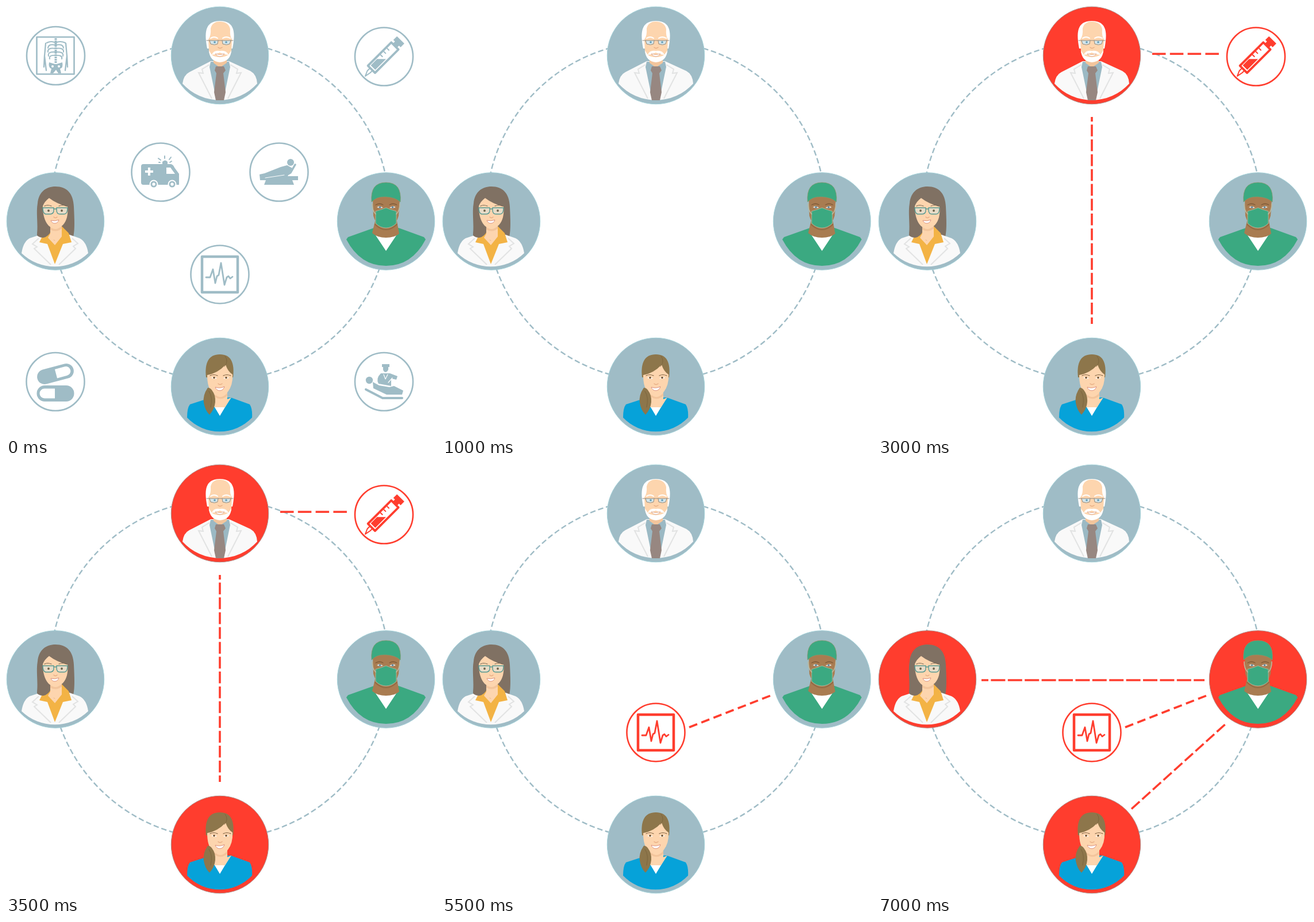
Write an HTML page that moves like this. It is 748 by 748 pixels and loops after 8000 ms.

```html
<!DOCTYPE html>
<html>
<head>
<meta charset="utf-8">
<style>
html, body { margin: 0; width: 100%; height: 100%; overflow: hidden; background: #fff }
svg { display: block; width: 100vw; height: 100vh }
.icon { color: #9fbcc6; fill: currentColor; stroke: none }
.icon.hot { color: #ff3d2e }
.icon .o { fill: none; stroke: currentColor; stroke-linecap: round; stroke-linejoin: round }
.icon .rim { fill: #fff; stroke: currentColor; stroke-width: 2.6 }
.icon .w { fill: #fff }
.disc { fill: #9fbcc6; stroke: #a6d3da; stroke-width: 1 }
.hot .disc { fill: #ff3d2e; stroke: #b08a86 }
.link { stroke: #ff3d2e; stroke-width: 3.6; fill: none }
.skin { fill: #fdd5ae }
.shade { fill: #f3c59c }
.coat { fill: #f9f9f9 }
.fold { fill: none; stroke: #e2e3e3; stroke-width: 2 }
.line { fill: none; stroke-linecap: round }
</style>
</head>
<body>
<svg viewBox="0 0 748 748">
  <circle cx="372" cy="357" r="295" fill="none" stroke="#9fbcc6" stroke-width="2.4" stroke-dasharray="9.5 4.8"/>

  <!-- links -->
  <path id="syringeLink" class="link" d="M477 83.300H593" stroke-dasharray="23.500 7.300"/>
  <path id="downLink" class="link" d="M372 193V553" stroke-dasharray="20.500 5.300" stroke-dashoffset="12.500"/>
  <path id="pulseLink" class="link" d="M430 458L571 403" stroke-dasharray="15 7.7"/>
  <g id="teamLinks" class="link">
    <path d="M180 376H568" stroke-dasharray="25 4.4" stroke-dashoffset="13"/>
    <path d="M441 600L606 451" stroke-dasharray="19 6"/>
  </g>

  <!-- senior doctor -->
  <g id="doctor">
    <circle class="disc" cx="372" cy="86" r="84.7"/>
    <path class="coat" d="M307 135Q309 120 319 115L356 96H388L425 113Q436 119 437 135A88 88 0 0 1 307 135Z"/>
    <path d="M356 97L354 106L366 164H378L390 106L388 97Z" fill="#9bb9c4"/>
    <path class="fold" d="M354 102L341 110L343 117L335 116L358 161M390 102L403 110L401 117L409 116L386 161"/>
    <path class="shade" d="M361 88H384V99L372 107L361 99Z"/>
    <path d="M365 105H379L382 112L378 117L382 150L379 164H365L362 150L366 117L363 112Z" fill="#978781"/>
    <path d="M350 74C345 48 345 26 372 26S399 48 394 74Z" fill="#fff"/>
    <path class="skin" d="M352 58Q357 52 356 39C358 30 365 27 372 27S388 30 390 40Q389 52 393 58L392 80Q388 94 372 97Q356 94 353 80Z"/>
    <path d="M353 77Q358 86 361 87Q372 91 383 87Q387 86 392 77Q391 96 372 98Q354 96 353 77Z" fill="#fff"/>
    <path d="M358 85Q361 76 372 78Q383 76 387 85Q378 84 372 81Q366 84 358 85Z" fill="#fff"/>
    <path d="M364 83Q372 86 380 83Q377 88 372 88Q367 88 364 83Z" fill="#fff" stroke="#d99c80" stroke-width=".8"/>
    <path d="M354 60H369L368 65Q361 69 356 66ZM376 60H391L389 66Q382 69 377 65Z" fill="#d4e5ea"/>
    <path class="line" d="M349 60H395M354 60L356 66Q363 69 368 66L369 60M376 60L377 66Q384 69 389 66L391 60" stroke="#92897c" stroke-width="1"/>
    <circle cx="363" cy="63" r="1.8" fill="#639eb9"/><circle cx="383" cy="63" r="1.8" fill="#639eb9"/>
    <path class="line" d="M356 56Q362 52 368 56M377 56Q383 52 390 56" stroke="#fff" stroke-width="2"/>
    <path class="line" d="M369 72Q372 75 376 72" stroke="#e7ad83" stroke-width="1.3"/>
  </g>

  <!-- woman with glasses -->
  <g id="woman">
    <circle class="disc" cx="86" cy="374.5" r="84.7"/>
    <path d="M54 399C56 378 52 360 55 343C57 323 70 314 86 314C106 314 117 326 118 349C119 370 120 389 117 402H60Z" fill="#807163"/>
    <path class="coat" d="M27 430Q30 410 41 404L62 397H108L128 404Q140 410 143 430A84 84 0 0 1 27 430Z"/>
    <path d="M64 399L58 411L72 414L85 449L99 414L114 411L109 395L97 383L77 392Z" fill="#f3b345"/>
    <path d="M54 399L57 370H75L78 392Q74 401 65 403Q58 403 54 399Z" fill="#807163"/>
    <path class="skin" d="M77 380H97V401L85 416L73 403L77 396Z"/>
    <path class="shade" d="M77 384Q87 393 97 382V387Q88 395 77 389Z"/>
    <path class="skin" d="M64 348Q67 340 75 334Q88 344 107 349Q109 370 99 381Q86 393 74 382Q64 371 64 348Z"/>
    <path class="fold" d="M57 404L46 414L54 419L49 422L78 450M115 404L125 413L117 418L121 422L92 450"/>
    <path d="M64 351H83V357Q82 362 76 362H69Q64 361 64 351ZM88 351H107Q107 362 101 362H94Q88 362 88 355Z" fill="#e8dcc8" stroke="#579a92" stroke-width="1.4"/>
    <path d="M83 353H88" stroke="#579a92" stroke-width="1.5"/>
    <circle cx="74" cy="356" r="1.9" fill="#70644b"/><circle cx="97" cy="356" r="1.9" fill="#70644b"/>
    <path class="line" d="M67 348Q72 345 79 348M92 348Q99 345 105 348" stroke="#75634f" stroke-width="1.2"/>
    <path class="line" d="M83 367Q86 370 89 367" stroke="#e7ad83" stroke-width="1.3"/>
    <path d="M78 373Q85 375 92 372Q90 378 85 378Q80 378 78 373Z" fill="#fff" stroke="#d98a78" stroke-width=".9"/>
    <path class="line" d="M83 407L85 408" stroke="#eab58b"/>
  </g>

  <!-- surgeon -->
  <g id="surgeon">
    <circle class="disc" cx="661" cy="374.5" r="84.7"/>
    <path d="M592 406L595 402L640 386H683L727 402L730 406Q706 452 661 452T592 406Z" fill="#3ba981"/>
    <path d="M643 399H679L661 426Z" fill="#fff"/>
    <path d="M642 374H680L684 396Q676 403 661 403T637 395Z" fill="#a97c51"/>
    <path class="line" d="M642 380Q661 398 680 380" stroke="#946b44" stroke-width="2"/>
    <path d="M638 336Q661 324 685 336L683 365Q676 388 661 388T639 365Z" fill="#a97c51"/>
    <path d="M636 341Q633 307 661 307T686 341Q678 333 661 332T636 341Z" fill="#3ba981" stroke="#8d9468" stroke-width=".7"/>
    <path d="M643 357Q654 354 661 351Q668 354 679 357V378Q671 386 661 386T643 378Z" fill="#3ba981" stroke="#b0c0a6" stroke-width=".8"/>
    <path class="line" d="M637 344Q637 356 643 362M685 344Q685 356 679 362" stroke="#bbb99f" stroke-width="1.6"/>
    <path d="M645 350Q650 346 656 351Q650 353 645 350ZM667 351Q673 346 678 350Q673 353 667 351Z" fill="#dfe5e5"/>
    <circle cx="650.5" cy="350" r="1.8" fill="#5e8499"/><circle cx="672.5" cy="350" r="1.8" fill="#5e8499"/>
    <path class="line" d="M643 346Q650 342 656 346M667 346Q673 342 680 346" stroke="#805b38" stroke-width="1.3"/>
  </g>

  <!-- nurse -->
  <g id="nurse">
    <circle class="disc" cx="372" cy="662" r="84.7"/>
    <path d="M315 716Q315 699 320 693L357 681H391L424 693Q429 701 428 716A78 78 0 0 1 315 716Z" fill="#06a2d9"/>
    <path d="M357 688L372 713L387 688Z" fill="#fff"/>
    <path class="skin" d="M362 668H385V684L392 681L381 698H363L353 683L362 684Z"/>
    <path class="shade" d="M362 674Q373 687 385 673V678Q374 688 362 679Z"/>
    <path d="M348 646C345 620 353 606 372 606S398 620 395 646Z" fill="#8d764b"/>
    <path class="skin" d="M350 642Q368 639 382 624Q386 636 394 641Q395 659 386 671Q373 685 359 673Q350 664 350 642Z"/>
    <path d="M351 664Q355 664 358 668Q365 677 364 689T354 711Q346 703 344 690T351 664Z" fill="#8d764b"/>
    <path class="line" d="M381 609Q388 618 380 627M353 670Q360 680 356 698" stroke="#7a643d" stroke-width=".9"/>
    <path d="M357 647Q362 643 367 648Q361 649 357 647ZM378 648Q383 643 388 647Q384 649 378 648Z" fill="#fff"/>
    <circle cx="362" cy="646.5" r="1.8" fill="#715536"/><circle cx="383" cy="646.5" r="1.8" fill="#715536"/>
    <path class="line" d="M355 643Q361 640 368 643M378 643Q384 640 391 643" stroke="#795d3d" stroke-width="1.2"/>
    <path class="line" d="M369 657Q372 660 376 657" stroke="#e7ad83" stroke-width="1.3"/>
    <path d="M364 663Q372 666 380 662Q378 669 372 669T364 663Z" fill="#fff" stroke="#d98a78" stroke-width=".9"/>
  </g>

  <!-- icons -->
  <g id="others">
    <g class="icon">
      <circle class="rim" cx="86.5" cy="86.5" r="50.5"/>
      <rect class="o" x="53.5" y="54" width="65" height="64.5" stroke-width="2.6"/>
      <path class="o" d="M86.5 56V100" stroke-width="4" stroke-dasharray="3 1" style="stroke-linecap:butt"/>
      <path class="o" d="M71 64Q79 60 86 64Q94 60 103 64M86 68Q74 65 73 73M86 68Q99 65 100 73M86 74Q72 72 73 80M86 74Q101 72 100 80M86 80Q72 79 74 87M86 80Q101 79 99 87M86 86Q74 85 76 92M86 86Q99 85 97 92" stroke-width="2"/>
      <path class="o" d="M69 65L67 87L70 112M104 65L106 87L103 112M67 86L66 106M106 86L107 106" stroke-width="2.3"/>
      <path d="M75 98L85 101H88L98 98Q100 108 94 109L96 117H91L87 111L82 117H77L79 109Q73 107 75 98Z"/>
      <circle class="w" cx="81" cy="105" r="2"/><circle class="w" cx="92" cy="105" r="2"/>
    </g>
    <g class="icon">
      <circle class="rim" cx="269" cy="289" r="50.5"/>
      <path d="M239 275H287Q291 276 293 281L301 292V311H239Q235 311 235 307V279Q235 275 239 275ZM272 275V271Q277 266 281 271V275Z"/>
      <path class="w" d="M247 281H251V286H256V290H251V295H247V290H242V286H247ZM279 281H286L294 292H279Z"/>
      <g stroke="#fff" stroke-width="2"><circle cx="257" cy="310" r="6.5"/><circle cx="289" cy="310" r="6.5"/></g>
      <circle class="w" cx="257" cy="310" r="2.7"/><circle class="w" cx="289" cy="310" r="2.7"/>
      <path class="o" d="M265 265L269 268M268 272H266M276 261V265M284 267L287 263M285 272L288 270" stroke-width="2"/>
    </g>
    <g class="icon">
      <circle class="rim" cx="475" cy="289" r="50.5"/>
      <circle cx="495" cy="272" r="6"/>
      <path d="M441 293L450 291L478 280L489 277L498 282L490 296H508V303H498L501 311H449L452 303H442Z"/>
      <path class="o" d="M503 276L495 290L484 296" stroke-width="3.5"/>
      <path class="o" d="M451 299L484 294" stroke-width="1" style="stroke:#fff"/>
    </g>
    <g class="icon">
      <circle class="rim" cx="86" cy="653.5" r="50.5"/>
      <g transform="rotate(-15 86 640)">
        <rect x="53.5" y="627" width="65" height="26" rx="13"/>
        <path class="w" d="M87 632H105A8 8 0 0 1 105 648H87Z"/>
      </g>
      <rect x="53.5" y="660" width="65" height="28" rx="14"/>
      <path class="w" d="M85 665.500H67A8.500 8.500 0 0 0 67 682.500H85Z"/>
    </g>
    <g class="icon">
      <circle class="rim" cx="657.5" cy="653.5" r="50.5"/>
      <path d="M654 623H667V628H665Q666 636 660 637Q655 636 656 628H654ZM652 639H668L681 644L679 650L670 648V661L648 657Q643 648 652 639Z"/>
      <circle cx="632" cy="651" r="6.2"/>
      <path d="M638 654L649 660L667 663L675 661L691 669L689 676H662L639 665Z"/>
      <path class="o" d="M626 667L655 682H689" stroke-width="4"/>
      <path class="o" d="M657 641L660 649L664 641M665 655L672 647" style="stroke:#fff" stroke-width="1.2"/>
    </g>
  </g>
  <g id="syringe" class="icon">
    <circle class="rim" cx="657.5" cy="88" r="50.5"/>
    <g transform="translate(657.5 88) rotate(-45)">
      <rect class="o" x="-31" y="-8.500" width="57.500" height="17.500" stroke-width="3.800"/>
      <path d="M27 -5H32V-9H41V9H32V5H27ZM-27 -5.500H-11.500L-.5 5.500H-27Z"/>
      <path class="o" d="M-33 -3H-38L-47 1L-37 3H-33" stroke-width="2"/>
      <path class="o" d="M-2 -6V-2M6 -6V-2M14 -6V-2" stroke-width="2"/>
    </g>
  </g>
  <g id="pulse" class="icon">
    <circle class="rim" cx="372" cy="467" r="50.5"/>
    <rect class="o" x="341" y="436" width="62" height="62" stroke-width="4.5"/>
    <path class="o" d="M348 472H355L360 458L364 482L367 470L370 468L374 447L380 485L384 472L387 470L390 474L394 471" stroke-width="2.8"/>
  </g>
</svg>
<script>
const LOOP = 8000;
const el = id => document.getElementById(id);
const during = (t, from, to) => t >= from && t < to;
const show = (id, on) => el(id).style.display = on ? '' : 'none';
const heat = (id, on) => el(id).classList.toggle('hot', on);

function draw(t) {
  const intro = t < 1000;
  const first = from => during(t, from, 4500);
  const second = from => t >= from;

  show('others', intro);
  show('syringe', intro || first(1500));
  heat('syringe', !intro);
  show('syringeLink', first(2000));
  heat('doctor', first(2500));
  show('downLink', first(3000));
  heat('nurse', first(3500) || second(7000));

  show('pulse', intro || second(5000));
  heat('pulse', !intro);
  show('pulseLink', second(5500));
  heat('surgeon', second(6000));
  show('teamLinks', second(6500));
  heat('woman', second(7000));
}

const start = performance.now();
function tick() {
  draw((performance.now() - start) % LOOP);
  requestAnimationFrame(tick);
}
tick();
</script>
</body>
</html>
```
